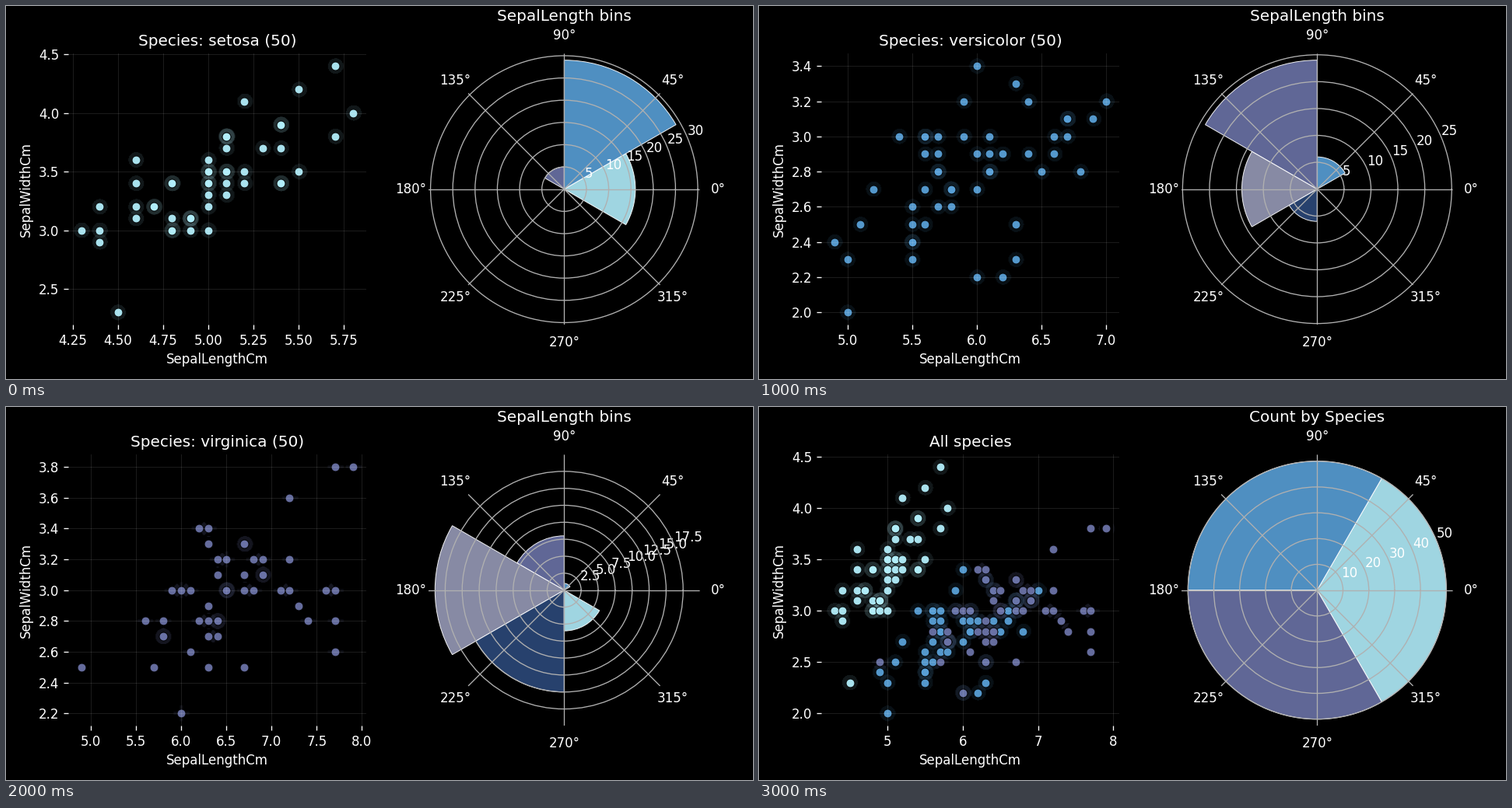
These frames come from a looping animation (960 px wide and 480 px high, 4000 ms). A matplotlib script:

```python
import numpy as np
import matplotlib.pyplot as plt
from matplotlib.animation import FuncAnimation
from matplotlib.ticker import MultipleLocator

plt.style.use("dark_background")
plt.rcParams.update({
    "font.family": "DejaVu Sans",
    "font.size": 10,
    "grid.color": "#b0b0b0",
    "grid.linewidth": 0.8,
})

W, H, DPI = 960, 480, 120
COLORS = ["#b2eefb", "#59a0d7", "#6b73a7", "#979ab7", "#2c497a"]
HALO_RADIUS, HALO_ALPHA, VISIBLE = 10.3, 0.1, 0.084

# Sepal width -> sepal lengths, both in millimetres.
SETOSA = {
    23: [45], 29: [44], 30: [43, 44, 48, 48, 49, 50],
    31: [46, 48, 49, 49, 49], 32: [44, 46, 47, 47, 50], 33: [50, 51],
    34: [46, 48, 48, 50, 50, 51, 52, 54, 54], 35: [50, 50, 51, 51, 52, 55],
    36: [46, 50], 37: [51, 53, 54], 38: [51, 51, 51, 57], 39: [54, 54],
    40: [58], 41: [52], 42: [55], 44: [57],
}
VERSICOLOR = {
    20: [50], 22: [60, 62], 23: [50, 55, 63], 24: [49, 55, 55],
    25: [51, 55, 56, 63], 26: [55, 57, 58], 27: [52, 56, 58, 58, 60],
    28: [57, 57, 61, 61, 65, 68], 29: [56, 57, 60, 61, 62, 64, 66],
    30: [54, 56, 56, 57, 59, 61, 66, 67], 31: [67, 67, 69],
    32: [59, 64, 70], 33: [63], 34: [60],
}
VIRGINICA = {
    22: [60], 25: [49, 57, 63, 67], 26: [61, 77], 27: [58, 58, 63, 64],
    28: [56, 58, 62, 63, 64, 64, 74, 77], 29: [63, 73],
    30: [59, 60, 61, 65, 65, 65, 67, 68, 71, 72, 76, 77],
    31: [64, 67, 69, 69], 32: [64, 65, 68, 69, 72], 33: [63, 67, 67],
    34: [62, 63], 36: [72], 38: [77, 79],
}


def points(rows):
    return np.array([(x, y) for y, xs in rows.items() for x in xs]) / 10


FLOWERS = [points(rows) for rows in (SETOSA, VERSICOLOR, VIRGINICA)]
BIN_TITLE = "SepalLength bins"

# title, species shown, x and y tick steps, polar title, counts, ring step
SCENES = [
    ("Species: setosa (50)", [0], 0.25, 0.5,
     BIN_TITLE, [16, 29, 5, 0, 0, 0], 5),
    ("Species: versicolor (50)", [1], 0.5, 0.2,
     BIN_TITLE, [0, 6, 24, 14, 6, 0], 5),
    ("Species: virginica (50)", [2], 0.5, 0.2,
     BIN_TITLE, [0, 1, 8, 19, 15, 6], 2.5),
    ("All species", [0, 1, 2], 1, 0.5,
     "Count by Species", [50, 50, 50], 10),
]


def pixel_box(left, top, width, height):
    return [left / W, 1 - (top + height) / H, width / W, height / H]


fig = plt.figure(figsize=(W / DPI, H / DPI), dpi=DPI, facecolor="black")
scatter_ax = fig.add_axes(pixel_box(79.8, 61.4, 383.4, 348.6))
polar_ax = fig.add_axes(pixel_box(543, 61.4, 348.6, 348.6), projection="polar")


def limits(values):
    low, high = values.min(), values.max()
    margin = 0.05 * (high - low)
    return low - margin, high + margin


def draw_glow(ax, species, x_step, y_step):
    """Blend soft discs; faint ones only show along grid lines."""
    (x0, x1), (y0, y1) = ax.get_xlim(), ax.get_ylim()
    cols, rows = 383, 349
    kx, ky = 383.4 / (x1 - x0), 348.6 / (y1 - y0)
    py, px = np.mgrid[:rows, :cols] + 0.5
    glow = np.zeros((rows, cols, 3))
    for i in species:
        color = np.array(plt.matplotlib.colors.to_rgb(COLORS[i]))
        for x, y in FLOWERS[i]:
            dist = np.hypot(px - (x - x0) * kx, py - (y - y0) * ky)
            cover = np.clip(HALO_RADIUS + 0.5 - dist, 0, 1)[..., None]
            glow += HALO_ALPHA * cover * (color - glow)

    def near_line(pos, low, scale, step):
        value = low + pos / scale
        return abs(value - np.round(value / step) * step) * scale < 2

    on_grid = near_line(px, x0, kx, x_step) | near_line(py, y0, ky, y_step)
    glow[(glow.max(axis=2) < VISIBLE) & ~on_grid] = 0
    ax.imshow(glow, extent=(x0, x1, y0, y1), origin="lower",
              aspect="auto", interpolation="bilinear", zorder=0)


def draw_scatter(title, species, x_step, y_step):
    ax = scatter_ax
    ax.clear()
    shown = np.vstack([FLOWERS[i] for i in species])
    ax.set_xlim(limits(shown[:, 0]))
    ax.set_ylim(limits(shown[:, 1]))
    draw_glow(ax, species, x_step, y_step)
    for i in species:
        ax.scatter(*FLOWERS[i].T, s=42, color=COLORS[i], alpha=0.95,
                   edgecolors="black", linewidths=0.5)
    ax.xaxis.set_major_locator(MultipleLocator(x_step))
    ax.yaxis.set_major_locator(MultipleLocator(y_step))
    ax.grid(color="white", alpha=0.11, linewidth=0.6)
    ax.spines[:].set_visible(False)
    ax.set_xlabel("SepalLengthCm")
    ax.set_ylabel("SepalWidthCm")
    ax.set_title(title)


def draw_polar(title, counts, ring_step):
    ax = polar_ax
    ax.clear()
    width = 2 * np.pi / len(counts)
    colors = [COLORS[i % len(COLORS)] for i in range(len(counts))]
    for i, count in enumerate(counts):
        if count:
            ax.bar(i * width, count, width=width, color=colors[i], alpha=0.9,
                   edgecolor="white", linewidth=0.6)
    top = max(counts) * 1.05
    ax.set_ylim(0, top)
    ax.set_yticks(np.arange(ring_step, top, ring_step))
    ax.spines["polar"].set_visible(False)
    ax.grid(True)
    ax.set_title(title)


def draw(frame):
    title, species, x_step, y_step, polar_title, counts, ring_step = SCENES[frame]
    draw_scatter(title, species, x_step, y_step)
    draw_polar(polar_title, counts, ring_step)
    return []


animation = FuncAnimation(fig, draw, frames=len(SCENES), interval=1000,
                          init_func=lambda: [], repeat=True)
plt.show()
```
